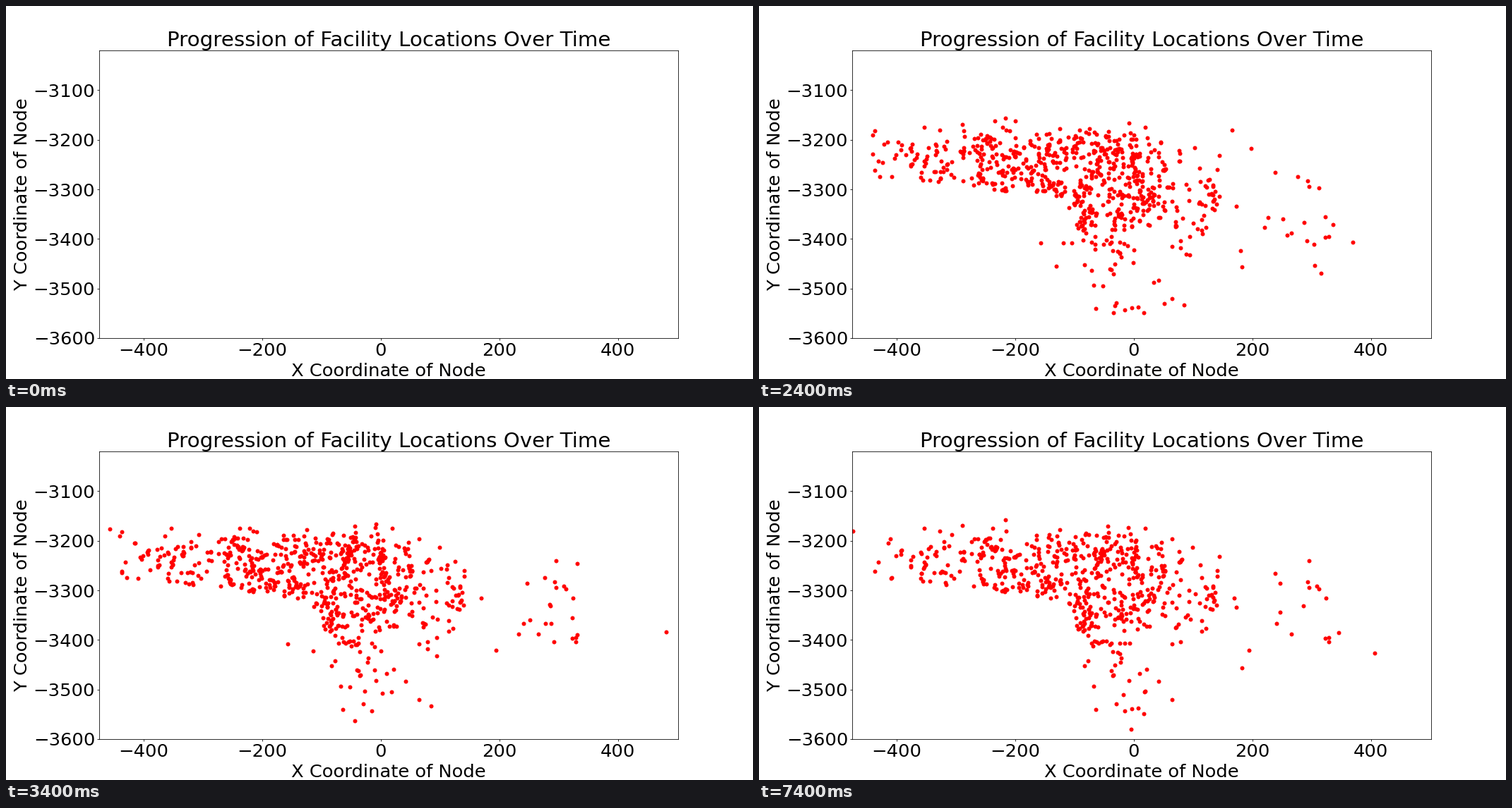
Animation, 1058 px wide and 529 px high, one loop 8000 ms. Source, as a matplotlib script:

```python
import numpy as np
import matplotlib.pyplot as plt
from matplotlib.animation import FuncAnimation
from matplotlib.path import Path

STEP = 200      # ms per frame
FRAMES = 40
STARTS = [0, 1, 9, 11, 12, 13, 14, 15, 17, 20, 37]  # first frame of each stage

rng = np.random.default_rng(12)

# Dense regions in stage pixels: node count and outline
REGIONS = [
    (260, [(200, 196), (300, 182), (425, 182), (425, 272), (390, 270), (200, 243)]),
    (210, [(310, 183), (425, 180), (425, 272), (390, 270), (310, 256)]),
    (580, [(418, 180), (535, 182), (552, 290), (536, 336), (458, 334),
           (436, 300), (436, 272), (418, 270)]),
    (160, [(520, 182), (608, 187), (660, 235), (645, 300), (550, 325)]),
]

# The farthest facilities of each populated stage
EXTREMES = [
    [],
    [(151, 214), (901, 287), (567, 433)],
    [(135, 200), (911, 300), (540, 452), (330, 170)],
    [(161, 210), (841, 335), (502, 435), (349, 159)],
    [(148, 215), (935, 319), (510, 441)],
    [(147, 222), (843, 341), (527, 451), (378, 161)],
    [(147, 173), (935, 319), (527, 451)],
    [(147, 173), (935, 319), (494, 445)],
    [(133, 176), (872, 349), (527, 457), (349, 160)],
]


def fill(count, outline):
    """Nodes inside an outline, many of them paired into short strings."""
    path = Path(outline)
    low, high = np.min(outline, axis=0), np.max(outline, axis=0)
    nodes = []
    while len(nodes) < count:
        if nodes and rng.random() < 0.45:
            node = nodes[-1] + rng.normal(0, (2, 7))
        else:
            node = rng.uniform(low, high)
        if path.contains_point(node):
            nodes.append(node)
    return np.array(nodes)


def tails():
    """Sparse nodes that thin out to the right, below, left and above."""
    x = 565 + 260 * rng.random(100) ** 2
    right = np.column_stack([x, rng.normal(265 + 0.22 * (x - 565), 38)])
    y = 335 + 100 * rng.random(84) ** 1.8
    below = np.column_stack([rng.normal(490 + 0.4 * (y - 335), 36), y])
    left = rng.uniform((160, 174), (225, 245), (30, 2))
    above = rng.uniform((230, 163), (550, 182), (34, 2))
    return [right, below, left, above]


def make_stages():
    pool = np.vstack([fill(*region) for region in REGIONS] + tails())
    keep = rng.random(len(pool)) < 0.5
    wide = rng.normal((500, 262), (175, 75), (260, 2))
    stages = [np.empty((0, 2))]
    for i, extremes in enumerate(EXTREMES):
        redraw = rng.random(len(pool)) < 0.4
        keep = np.where(redraw, rng.random(len(pool)) < 0.5, keep)
        extra = extremes if i else wide
        stages.append(np.vstack([pool[keep], extra]))
    thinned = keep & (rng.random(len(pool)) < 0.86)
    stages.append(np.vstack([pool[thinned], EXTREMES[-1]]))
    return stages


def to_data(points):
    x = (points[:, 0] - 530.9) / 0.8393
    y = -3100 - (points[:, 1] - 119.5) / 0.7026
    return np.column_stack([x, y])


stages = [to_data(points) for points in make_stages()]

plt.rcParams["axes.linewidth"] = 1.1
fig, ax = plt.subplots(figsize=(20, 10), dpi=52.9)
ax.set_xlim(-475, 502)
ax.set_ylim(-3600, -3020.3)
ax.set_xticks(range(-400, 401, 200))
ax.set_yticks(range(-3600, -3099, 100))
ax.tick_params(labelsize=35, width=1.1, pad=4.7)
ax.set_title("Progression of Facility Locations Over Time", fontsize=40)
ax.set_xlabel("X Coordinate of Node", fontsize=35, labelpad=7.5)
ax.set_ylabel("Y Coordinate of Node", fontsize=35, labelpad=5)
dots = ax.scatter([], [], s=50, color="red")


def update(frame):
    stage = np.searchsorted(STARTS, frame, side="right") - 1
    dots.set_offsets(stages[stage])
    return (dots,)


anim = FuncAnimation(fig, update, frames=FRAMES, interval=STEP, repeat=True)
plt.show()
```
